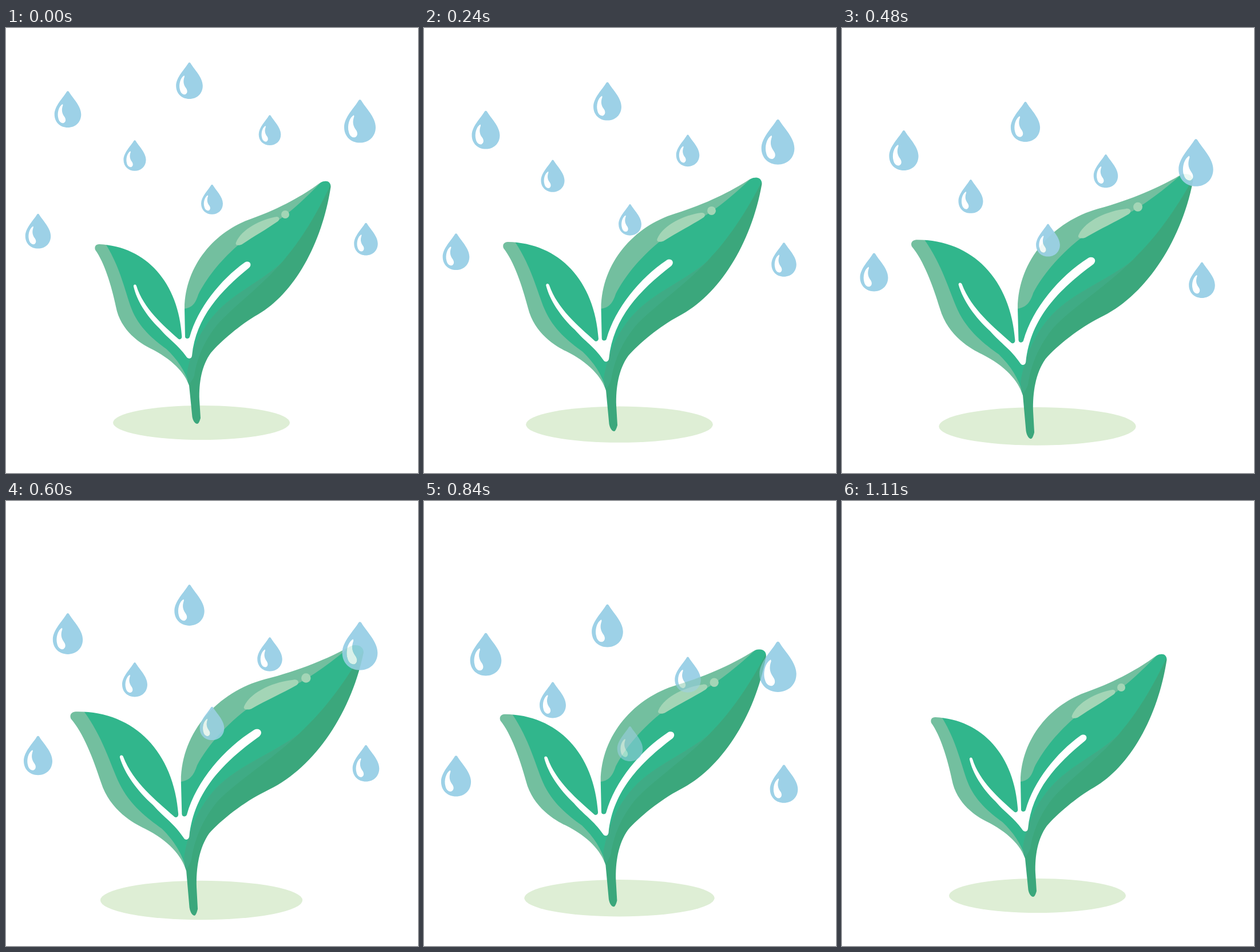
Write an HTML page with a canvas that moves like this. It is 720 px wide and 778 px high and loops after 1.2 s.

```html
<!DOCTYPE html>
<html lang="en">
<head>
<meta charset="utf-8">
<title>Sprout in the rain</title>
<style>
  html, body { margin: 0; width: 100%; height: 100%; overflow: hidden; background: #fff; }
  canvas { display: block; width: 720px; height: 778px; }
</style>
</head>
<body>
<canvas id="stage" width="720" height="778"></canvas>
<script>
const ctx = document.getElementById('stage').getContext('2d');
const LOOP = 1200, STEP = 30, PEAK = 600, REST = 1110;

const plant = `M163,378 C245,382 302,445 307.5,541 L313,541 L312,490
  C313,415 365,355 430,333 C480,315 520,292 547,272 C550,270 553,268 557,268
  C562,267 568,270 567.5,278 C552,378 503,465 440,501 C410,518 375,548 358,568
  C342,590 337,620 338,650 L340,682 C338,689 336,692 334,692 C331,692 327,688 325.5,680
  L320,625 C312,602 290,579 252,560 C236,552 200,530 192,487 C184,450 172,410 156,388
  C154,382 157,378 163,378 Z`;
const veins = `M223,452 C222,448 227,447 228,451 C240,490 275,520 300,542.5
  C303,546 307,544 307.5,540 L313,540 C313.5,544 320,544 321,540
  C335,490 375,440 417,410 C425,405 431,413 425,419 C375,460 332,505 325,573
  C324,579 318,579 315.5,575 C300,553 285,545 268,525 C245,503 228,475 223,452 Z`;
const shades = [
  ['#73bf9f', `M160,370 L175,379 C200,420 208,460 219,490 C232,524 258,545 280,561
    C300,580 312,598 320,622 L300,625 L180,550 L140,385 Z`],
  ['#73bf9f', `M552,268 C525,296 498,322 470,340 C440,358 420,368 404,381
    C372,409 349,440 336,466 C331,482 325,489 311,491 L300,490 L340,360 L430,320 Z`],
  ['#3fab85', `M494,398 C455,440 400,460 365,500 C340,528 324,562 316,604
    L320,640 L345,640 L420,540 Z`],
  ['#3ba77c', `M569,270 C550,312 520,365 490,400 C455,445 395,488 368,520
    C340,555 332,588 329,608 C325,618 321,620 318,628 L320,700 L350,700
    L350,620 L380,560 L480,500 L580,360 Z`],
  ['#a3d5b6', `M402,375 C412,351 446,335 470,330.5 C477,328 480,334 475,338
    C455,352 435,363 412,378.5 C406,381 400,380 402,375 Z`]
];

const glint = `M-9,23 C-16,27 -19,39 -16.5,48 C-15,55 -10,57 -7,56
  C-3,54 -3,49 -6,45 C-11,38 -11,32 -8.5,25 Z`;
const glintPath = new Path2D(glint);
const dropPath = new Path2D(`M-2,1.5 Q0,-1 2,1.5 C8,12 23.3,26 23.3,41 C23.3,55 13,64 0,64
  C-13,64 -23.3,55 -23.3,41 C-23.3,26 -8,12 -2,1.5 Z ` + glint);
// x, y of the tip, size
const drops = [
  [108, 110, 1], [320.5, 60, 1], [618.5, 125, 1.18], [461, 152, .83],
  [225, 196, .84], [360, 273.5, .815], [56, 324.5, .955], [629, 340.5, .89]
];

// Spread the leaves out from the stem, more towards their bowing tips
function warp(x, y, k) {
  const spread = .21 * Math.tanh(Math.max(0, 600 - y) / 150);
  return [
    x + k * (spread * (x - 320) - 4),
    y + k * (.132 * (y - 491) + .00029 * (x - 318) ** 2)
  ];
}

function fill(path, color, mode) {
  ctx.globalCompositeOperation = mode;
  ctx.fillStyle = color;
  ctx.fill(path, 'evenodd');
}

function drawPlant(k) {
  const bend = d => new Path2D(d.replace(/([\d.]+),([\d.]+)/g, (_, x, y) => warp(+x, +y, k).join()));
  fill(bend(plant), '#31b68c', 'source-over');
  for (const [color, d] of shades) fill(bend(d), color, 'source-atop');
  const dot = new Path2D();
  dot.arc(...warp(488, 326, k), 7 + k, 0, 7);
  fill(dot, '#a3d5b6', 'source-atop');
  fill(bend(veins), '#000', 'destination-out');
  const ground = new Path2D();
  ground.ellipse(341.5, 690 + 6.5 * k, 154.5 + 18 * k, 30 + 3.4 * k, 0, 0, 7);
  fill(ground, '#deeed5', 'destination-over');
}

function drawDrops(t, alpha, mode) {
  ctx.globalAlpha = alpha;
  for (const [x, y, size] of drops) {
    const s = size * (1 + .000206 * t);
    ctx.save();
    ctx.translate(x, y + .1433 * t);
    ctx.scale(s, s);
    fill(dropPath, '#9dd1e7', mode);
    fill(glintPath, '#fff', mode);
    ctx.restore();
  }
  ctx.globalAlpha = 1;
}

function draw(time) {
  const t = Math.floor(time % LOOP / STEP) * STEP;
  const k = 1.23 * Math.max(0, Math.min(t / PEAK, (REST - t) / (REST - PEAK)));
  const alpha = Math.max(0, 1 - (t / REST) ** 2.8);
  ctx.clearRect(0, 0, 720, 778);
  drawPlant(k);
  // Drops fade over the leaves but stay solid on the bare ground until half faded
  drawDrops(t, alpha, 'source-atop');
  if (alpha >= .5) drawDrops(t, 1, 'destination-over');
}

let start;
function loop(now) {
  start ??= now;
  draw(now - start);
  requestAnimationFrame(loop);
}
requestAnimationFrame(loop);
</script>
</body>
</html>
```
